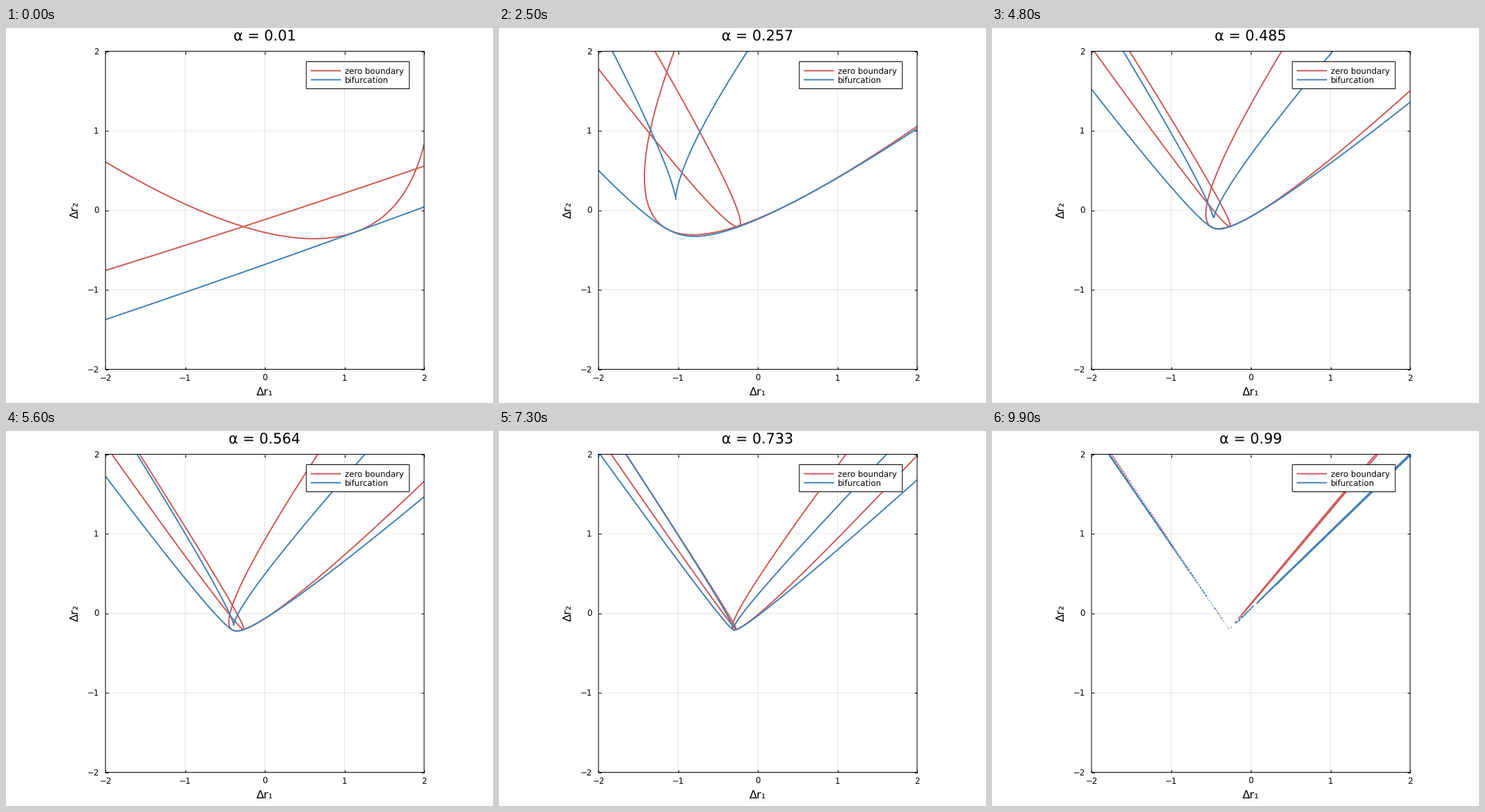
These frames come from a looping animation (700x540 px, 10 s). A matplotlib script:

```python
import numpy as np
import matplotlib.pyplot as plt
from matplotlib.animation import FuncAnimation
from matplotlib.patches import Rectangle

W, H, DPI = 700, 540, 100
PX = 72 / DPI
FRAMES, INTERVAL = 100, 100
RED, BLUE = "#cd5c5c", "#4682b4"
LEFT, TOP, RIGHT, BOTTOM = 143, 33.5, 601, 491.5

plt.rcParams.update({"font.family": "DejaVu Sans", "path.snap": False,
                     "text.hinting": "no_hinting"})

# Two-species equilibrium with pairwise and higher-order terms:
# dr = P0 + s * (A1 y1 + A2 y2 + B1 y1^2 + B2 y2^2 + C y1 y2)
P0 = (-0.27, -0.205)
A1, B1 = (1, -0.309), (-10.3, 15.36)
A2, B2 = (1, 0.326), (0.464, 0.5525)
C = (-1.847, 1.438)

axis = np.linspace(-2, 2, 401)
X, Y = np.meshgrid(axis, axis)


def cross(a, b):
    return a[0] * b[1] - a[1] * b[0]


def parabola(u, a, b):
    """Implicit form of the curve a*y + b*y^2."""
    return cross(a, u) - cross(b, u) ** 2 / cross(a, b)


def pencil():
    """Parts of the determinant of the pencil spanned by both conics."""
    def lin(v, k=1.0):
        return np.poly1d([v[1] * k, v[0] * k])
    p, r, h = lin(B1), lin(B2), lin(C, 0.5)
    e, f = lin(A1, 0.5), lin(A2, 0.5)
    return (p * r - h * h).coeffs, (2 * h * e * f - p * f * f - r * e * e).coeffs


Q, R = pencil()


def tangency(u):
    """Discriminant that vanishes where two equilibria merge."""
    x, y = u
    a = R[0] - y * Q[0]
    b = R[1] - y * Q[1] - x * Q[0]
    c = R[2] - y * Q[2] - x * Q[1]
    d = R[3] - x * Q[2]
    return (18 * a * b * c * d - 4 * b**3 * d + b**2 * c**2
            - 4 * a * c**3 - 27 * a**2 * d**2)


fig = plt.figure(figsize=(W / DPI, H / DPI), dpi=DPI, facecolor="white")
ax = fig.add_axes([LEFT / W, 1 - BOTTOM / H, (RIGHT - LEFT) / W, (BOTTOM - TOP) / H])
ax.set(xlim=(-2, 2), ylim=(-2, 2), xticks=range(-2, 3), yticks=range(-2, 3))
ax.set_axisbelow(True)
ax.grid(color="black", alpha=0.1, lw=PX)
ax.tick_params(direction="in", length=4 * PX, width=PX, top=True, right=True,
               labelbottom=False, labelleft=False)
for spine in ax.spines.values():
    spine.set_linewidth(PX)

# Overlay in pixel coordinates for text and legend
over = fig.add_axes([0, 0, 1, 1])
over.set(xlim=(0, W), ylim=(H, 0))
over.axis("off")


def label(x, y, text, size=11.8, ha="center", **kw):
    return over.text(x, y, text, fontsize=size * PX, ha=ha, va="baseline", **kw)


for v in range(-2, 3):
    name = str(v).replace("-", "\u2212")
    step = (v + 2) / 4
    label(LEFT + step * (RIGHT - LEFT), 508, name)
    label(133.6, BOTTOM - step * (BOTTOM - TOP) + 4.3, name, ha="right")
label(372, 529, "Δr₁", 16.2)
label(103.5, 262, "Δr₂", 16.2, rotation=90, rotation_mode="anchor")
title = label(372, 18, "", 20.65)

over.add_patch(Rectangle((431.7, 48.5), 148, 39, fc="white", ec="black", lw=PX))
for y, color, name in ((61.5, RED, "zero boundary"), (74.5, BLUE, "bifurcation")):
    over.plot([438, 481.5], [y, y], color=color, lw=2 * PX, solid_capstyle="butt")
    label(487, y + 4.5, name, ha="left")

curves = []


def update(i):
    while curves:
        curves.pop().remove()
    alpha = 0.01 + 0.98 * i / (FRAMES - 1)
    s = (1 - alpha) ** 2 / alpha
    u = (X - P0[0]) / s, (Y - P0[1]) / s
    layers = ((parabola(u, A1, B1), RED),
              (parabola(u, A2, B2), RED),
              (tangency(u), BLUE))
    for z, color in layers:
        z = z / np.abs(z).max()
        curve = ax.contour(X, Y, z, levels=[0], colors=[color], linewidths=2 * PX)
        curve.set_capstyle("round")
        curves.append(curve)
    title.set_text(f"α = {round(alpha, 3)}")
    return []


anim = FuncAnimation(fig, update, frames=FRAMES, interval=INTERVAL,
                     repeat=True, repeat_delay=0, blit=False)
plt.show()
```
